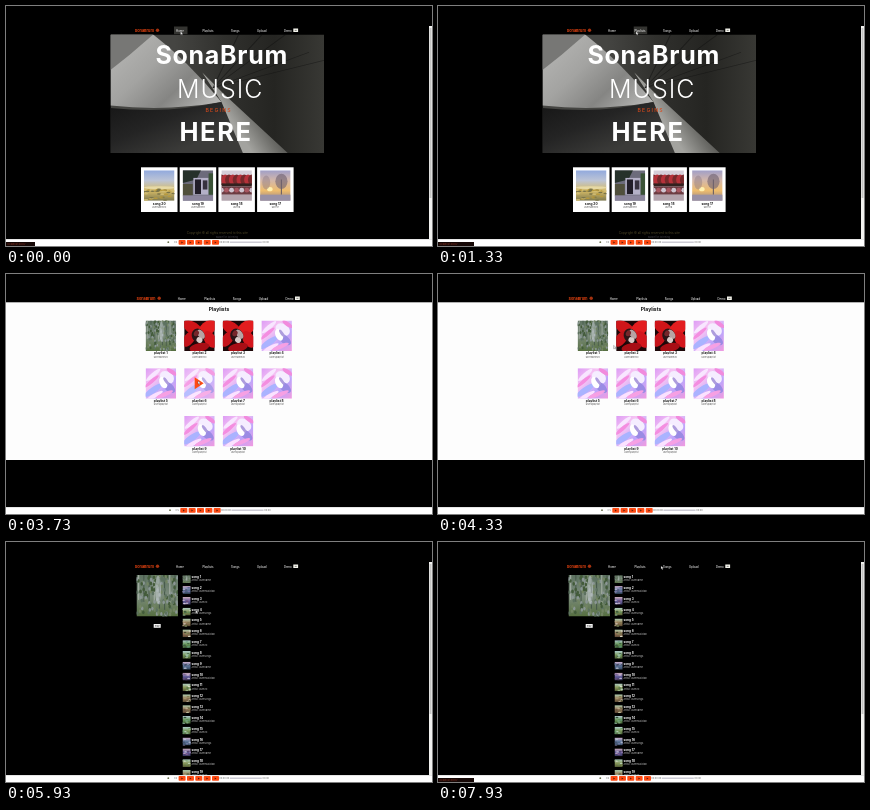
An HTML page with a canvas that plays this animation: 426x240 px, repeating every 8 s.

```html
<!DOCTYPE html>
<html lang="en">
<head>
<meta charset="utf-8">
<title>Music player tour</title>
<style>
html, body { margin: 0; width: 100%; height: 100%; overflow: hidden; background: #000; }
canvas { display: block; width: 426px; height: 240px; }
</style>
</head>
<body>
<canvas id="stage" width="426" height="240"></canvas>
<script>
const ctx = document.getElementById('stage').getContext('2d');
const LOOP = 8000, PLAYLISTS_AT = 1930, LOADING_AT = 5000, LOADED_AT = 5200;
const BRAND = 'SonaBrum', ORANGE = '#ff4a12';

// Cursor stops: time, x, y
const PATH = [
  [0, 174.5, 25.5], [850, 174.5, 25.5], [1250, 198, 25.5], [1950, 198, 25.5],
  [2600, 202, 53], [3000, 202, 53], [3350, 224, 84], [3730, 192, 107],
  [3950, 190, 104], [4600, 167, 52], [5250, 167, 52], [5800, 188, 62],
  [6350, 200, 106], [6800, 201, 89], [7250, 208, 72], [7900, 223, 24], [8000, 223, 24]
];

function cursorAt(t) {
  let i = 0;
  while (i < PATH.length - 2 && t >= PATH[i + 1][0]) i++;
  const [t0, x0, y0] = PATH[i], [t1, x1, y1] = PATH[i + 1];
  const k = (t - t0) / (t1 - t0), e = k * k * (3 - 2 * k);
  return [x0 + (x1 - x0) * e, y0 + (y1 - y0) * e];
}

function rect(x, y, w, h, fill) {
  ctx.fillStyle = fill;
  ctx.fillRect(x, y, w, h);
}

function disc(x, y, rx, ry, fill, turn = 0) {
  ctx.fillStyle = fill;
  ctx.beginPath();
  ctx.ellipse(x, y, rx, ry, turn, 0, 7);
  ctx.fill();
}

function shape(points, fill) {
  ctx.fillStyle = fill;
  ctx.beginPath();
  points.forEach(([x, y]) => ctx.lineTo(x, y));
  ctx.fill();
}

function text(s, x, y, size, fill, { weight = 400, align = 'left', spacing = 0 } = {}) {
  ctx.font = `${weight} ${size}px Inter, sans-serif`;
  ctx.letterSpacing = spacing + 'px';
  ctx.textAlign = align;
  ctx.fillStyle = fill;
  ctx.fillText(s, x, y);
}

function gradient(x0, y0, x1, y1, colors) {
  const g = ctx.createLinearGradient(x0, y0, x1, y1);
  colors.forEach((c, i) => g.addColorStop(i / (colors.length - 1), c));
  return g;
}

// Runs draw() in a clipped unit square mapped to the given box
function picture(x, y, w, h, draw) {
  ctx.save();
  ctx.beginPath();
  ctx.rect(x, y, w, h);
  ctx.clip();
  ctx.translate(x, y);
  ctx.scale(w, h);
  draw();
  ctx.restore();
}

function random(seed) {
  return () => {
    seed = (seed * 16807 + 11) % 2147483647;
    return seed / 2147483647;
  };
}

function forest() {
  rect(0, 0, 1, 1, gradient(0, 0, 0, 1, ['#5d7260', '#7b8b7c', '#566f40']));
  const r = random(47);
  for (let i = 0; i < 8; i++) {
    rect(.04 + i * .125, 0, .025, .6 + r() * .25, i % 3 ? '#46584a' : '#a9b2a8');
  }
  for (let i = 0; i < 130; i++) {
    disc(r(), r(), .03, .045, ['#435b3a', '#8a9694', '#5d7260', '#728463'][i % 4]);
  }
  disc(.52, .36, .07, .34, 'rgba(212,218,222,.5)');
}

function redBloom() {
  rect(0, 0, 1, 1, '#1c0708');
  disc(.28, .25, .36, .2, '#cf1519', .6);
  disc(.76, .26, .34, .22, '#e31d1f', -.7);
  disc(.16, .6, .3, .17, '#c5131a', -.9);
  disc(.85, .62, .3, .19, '#d3161c', 1);
  disc(.5, .88, .33, .14, '#a80e15', -.2);
  disc(.46, .5, .21, .24, '#2a1416', -.5);
  disc(.55, .45, .1, .17, '#b7a3a3', -.6);
  disc(.5, .64, .1, .09, '#d9cdca', .5);
  disc(.4, .42, .08, .1, '#76262a', .5);
}

function pastel() {
  rect(0, 0, 1, 1, gradient(0, 0, 1, 1, ['#dc9cf5', '#f6c4f3', '#bda5fb', '#f29adf']));
  disc(.25, .22, .3, .07, '#f8e6ff', -.7);
  disc(.2, .43, .3, .06, '#f48ee0', -.7);
  disc(.25, .72, .35, .1, '#aab3ff', -.6);
  disc(.3, .9, .3, .07, '#fbe2ff', -.5);
  disc(.7, .3, .25, .19, '#f5edff', .6);
  disc(.76, .62, .25, .13, '#9a8be4', .7);
  disc(.58, .47, .12, .2, '#ffffff', -.4);
  disc(.67, .42, .05, .14, '#ae9ddd', -.6);
  disc(.62, .86, .3, .07, '#f6a0e4', -.4);
  disc(.86, .12, .2, .07, '#f18bdd', .6);
}

function sunset() {
  rect(0, 0, 1, 1, gradient(0, 0, 0, 1, ['#91a9dd', '#bcc4d6', '#d6bb66', '#7d7950']));
  disc(.5, .57, .5, .05, '#e6d9a5');
  const r = random(8);
  for (let i = 0; i < 40; i++) {
    disc(r(), .62 + r() * .36, .07, .025, ['#b89a3d', '#797348', '#d1bc72'][i % 3]);
  }
}

function house() {
  rect(0, 0, 1, 1, '#6c6b7b');
  shape([[0, 0], [.6, 0], [.45, .3], [0, .42]], '#26312a');
  rect(.35, .25, .5, .55, '#b4b0c7');
  rect(.4, .3, .2, .48, '#211d28');
  rect(.66, .33, .15, .3, '#37323f');
  rect(.85, .1, .15, .7, '#3a5236');
  rect(0, .45, .33, .4, '#504f3c');
  rect(0, .82, 1, .18, '#8b859c');
}

function redTrees() {
  rect(0, 0, 1, 1, '#d5ced8');
  for (let i = 0; i < 9; i++) disc(i / 8, .31, .13, .17, i % 2 ? '#b6323a' : '#76292b');
  rect(0, .43, 1, .1, '#33211f');
  rect(0, .53, 1, .27, '#6d3c42');
  for (let i = 0; i < 7; i++) disc(i / 6, .65, .08, .08, i % 2 ? '#a75660' : '#cfc3cf');
  rect(0, .8, 1, .2, '#b4a4ad');
}

function winterTree() {
  rect(0, 0, 1, 1, gradient(0, 0, 0, 1, ['#a09fc8', '#d4b7a9', '#eebd6e', '#8e7d8b']));
  disc(.32, .62, .09, .07, '#fff0b0');
  rect(.68, .3, .035, .5, '#665c62');
  disc(.7, .36, .2, .25, 'rgba(110,98,112,.6)');
  disc(.2, .4, .13, .23, 'rgba(120,108,124,.35)');
  rect(0, .8, 1, .2, '#9991a5');
}

function landscape(seed) {
  const r = random(seed * 7919), hue = [90, 215, 245, 75, 35, 28, 105][seed % 7];
  rect(0, 0, 1, 1, gradient(0, 0, 0, 1, [
    `hsl(${hue + 90},25%,75%)`, `hsl(${hue},25%,48%)`, `hsl(${hue},28%,28%)`]));
  for (let i = 0; i < 7; i++) {
    disc(r(), .2 + r() * .8, .18, .09, `hsl(${hue + r() * 50},22%,${22 + r() * 60}%)`);
  }
}

function hero() {
  rect(0, 0, 1, 1, gradient(.3, 0, 1, 0, ['#454542', '#30302d', '#252522', '#383834']));
  // Pale curved canopy
  ctx.fillStyle = gradient(0, .2, .52, .5, ['#b2b2b0', '#a3a3a1', '#858583', '#b4b4b2']);
  ctx.beginPath();
  ctx.moveTo(0, 0);
  ctx.lineTo(.2, 0);
  ctx.quadraticCurveTo(.36, .22, .52, .57);
  ctx.quadraticCurveTo(.27, .65, 0, .6);
  ctx.fill();
  shape([[0, 0], [.2, 0], [.09, .17], [0, .3]], '#777775');
  // Shaded hall below it
  ctx.fillStyle = gradient(0, .6, .3, 1, ['#171717', '#242424', '#3b3b39']);
  ctx.beginPath();
  ctx.moveTo(0, .62);
  ctx.quadraticCurveTo(.28, .67, .52, .57);
  ctx.lineTo(.63, 1);
  ctx.lineTo(0, 1);
  ctx.fill();
  // Light falling along the wall
  shape([[.43, .32], [.53, .5], [.83, 1], [.62, 1], [.52, .57]],
    gradient(.52, .6, .74, .52, ['#a3a39f', '#6b6b67', '#383835']));
  ctx.strokeStyle = 'rgba(12,12,12,.45)';
  ctx.lineWidth = .005;
  for (let i = 0; i < 5; i++) {
    ctx.beginPath();
    ctx.moveTo(.48, .45);
    ctx.lineTo(.6 + i * .11, i < 3 ? 0 : i * .05);
    ctx.stroke();
  }
}

function navigation(shift, highlight) {
  if (highlight) rect(highlight, 20.5, 13.5, 7.7, '#343431');
  text(BRAND, 130.5 + shift, 25.7, 3.8, ORANGE, { weight: 600 });
  disc(153.2 + shift, 24.2, 1.7, 1.7, '#a5320f');
  [['Home', 175.7], ['Playlists', 203.7], ['Songs', 231], ['Upload', 257.4], ['Demo', 283.5]]
    .forEach(([s, x]) => text(s, x + shift, 25.5, 2.8, '#eee', { weight: 500, align: 'center' }));
  rect(289 + shift, 22.5, 4.8, 3.5, '#f4f4ec');
  rect(290.4 + shift, 23.9, 2, .7, '#555');
}

function player(shift) {
  rect(0, 233, 426, 7, '#fff');
  rect(0, 233, 426, .5, '#ccc');
  disc(164 + shift, 236.2, .9, .9, '#69704d');
  text('0.5', 169.6 + shift, 237.2, 2.2, '#555');
  for (let i = 0; i < 5; i++) {
    const x = 174.3 + shift + i * 8.35;
    ctx.fillStyle = ORANGE;
    ctx.beginPath();
    ctx.roundRect(x, 234, 7, 4.8, .8);
    ctx.fill();
    shape([[x + 2.7, 235.4], [x + 4.5, 236.4], [x + 2.7, 237.4]], '#5d210f');
  }
  text('00:00:00', 215 + shift, 237, 2.3, '#555');
  rect(225.5 + shift, 235.7, 32, .9, '#aaa7b7');
  text('00:00', 258.3 + shift, 237, 2.3, '#555');
}

function scrollbar(thumb) {
  rect(423, 20, 3, 213, '#f1f1ef');
  rect(423.6, 22, 1.8, thumb, '#c4c4c2');
}

function statusBar(width) {
  rect(0, 236, width, 4, '#160806');
  text('localhost:3000/', 1.5, 238.9, 2.4, '#8c3424');
}

function caption(title, user, x, y) {
  text(title, x, y, 3.2, '#111', { weight: 700, align: 'center' });
  text(user, x, y + 3.5, 2.4, '#555', { align: 'center' });
}

function homePage(t) {
  picture(104.5, 28.5, 213.5, 118.5, hero);
  const center = { align: 'center' };
  text(BRAND, 215.7, 58, 25, '#fff', { weight: 700, spacing: .7, ...center });
  text('MUSIC', 214.2, 92, 25, '#fff', { weight: 300, spacing: 1, ...center });
  text('BEGINS', 199.5, 106, 5.2, '#d94a1b', { weight: 500, spacing: 1.2 });
  text('HERE', 210, 134.5, 25.5, '#fff', { weight: 700, spacing: 1.6, ...center });

  [sunset, house, redTrees, winterTree].forEach((art, i) => {
    const x = 135 + i * 38.7;
    rect(x, 161.3, 36.5, 44.7, '#fff');
    picture(x + 3, 164.3, 30.5, 30.5, art);
    caption('song ' + (20 - i), ['username20', 'username19', 'user18', 'user17'][i], x + 18.2, 198.9);
  });
  text('Copyright © all rights reserved to this site', 211.3, 227.8, 3.1, '#514927', center);
  text('Made for listening', 221, 232, 2.6, '#45434a', center);
  const onHome = t < 1050;
  navigation(-1.7, onHome ? 168 : 195.7);
  scrollbar(170);
  player(-1.7);
  statusBar(onHome ? 29 : 36);
}

function playlistsPage(mx, my) {
  rect(0, 28.3, 426, 157.7, '#fdfdfd');
  text('Playlists', 213, 37, 5, '#111', { weight: 700, align: 'center' });
  for (let i = 0; i < 10; i++) {
    const slot = i < 8 ? i : i + 1;
    const x = 139.6 + (slot % 4) * 38.6, y = 46.5 + Math.floor(slot / 4) * 47.7;
    picture(x, y, 30.5, 30.5, i === 0 ? forest : i < 3 ? redBloom : pastel);
    caption('playlist ' + (i + 1), i < 3 ? 'username20' : 'usersplaylist', x + 15.2, y + 33.7);
    if (mx > x && mx < x + 30.5 && my > y && my < y + 30.5) {
      rect(x, y, 30.5, 30.5, 'rgba(255,255,255,.15)');
      shape([[x + 10.5, y + 9], [x + 19.5, y + 15], [x + 10.5, y + 21]], ORANGE);
    }
  }
  navigation(0);
  player(0);
}

function playButton(x, y) {
  rect(x, y, 7, 3.8, '#f5f5f5');
  text('Play', x + 3.5, y + 2.8, 2.5, '#333', { align: 'center' });
}

function loadingPage() {
  ctx.strokeStyle = '#48481c';
  ctx.lineWidth = .6;
  ctx.setLineDash([1, 1]);
  ctx.strokeRect(191, 33.5, 41, 41);
  ctx.setLineDash([]);
  playButton(207.5, 75);
  navigation(0);
  player(0);
}

function songsPage(t) {
  picture(130.5, 33, 41.5, 41.5, forest);
  playButton(147.7, 82);
  for (let i = 0; i < 19; i++) {
    const y = 33.3 + i * 10.82;
    picture(176.5, y, 8.2, 7.8, i ? () => landscape(i) : forest);
    text('song ' + (i + 1), 185.4, y + 2.9, 3.1, '#fff', { weight: 700 });
    const user = ['user20', 'usersongs', 'username', 'usermusician'][(i * 5 + 2) % 4];
    text('Artist: ' + user, 185.4, y + 6, 2.5, '#ccc');
  }
  navigation(-1.7);
  scrollbar(150);
  player(-1.7);
  if (t > 7830) statusBar(36);
}

function pointer(x, y) {
  const outline = [[0, 0], [0, 3.2], [.8, 2.5], [1.4, 3.7], [2, 3.4], [1.5, 2.2], [2.5, 2.1]];
  shape(outline.map(([dx, dy]) => [x + dx, y + dy]), '#fff');
  ctx.strokeStyle = '#333';
  ctx.lineWidth = .3;
  ctx.closePath();
  ctx.stroke();
}

function draw(now) {
  const t = now % LOOP, [x, y] = cursorAt(t);
  rect(0, 0, 426, 240, '#000');
  if (t < PLAYLISTS_AT) homePage(t);
  else if (t < LOADING_AT) playlistsPage(x, y);
  else if (t < LOADED_AT) loadingPage();
  else songsPage(t);
  pointer(x, y);
}

let start;
function frame(now) {
  start ??= now;
  draw(Math.max(0, now - start));
  requestAnimationFrame(frame);
}
draw(0);
requestAnimationFrame(frame);
</script>
</body>
</html>
```
